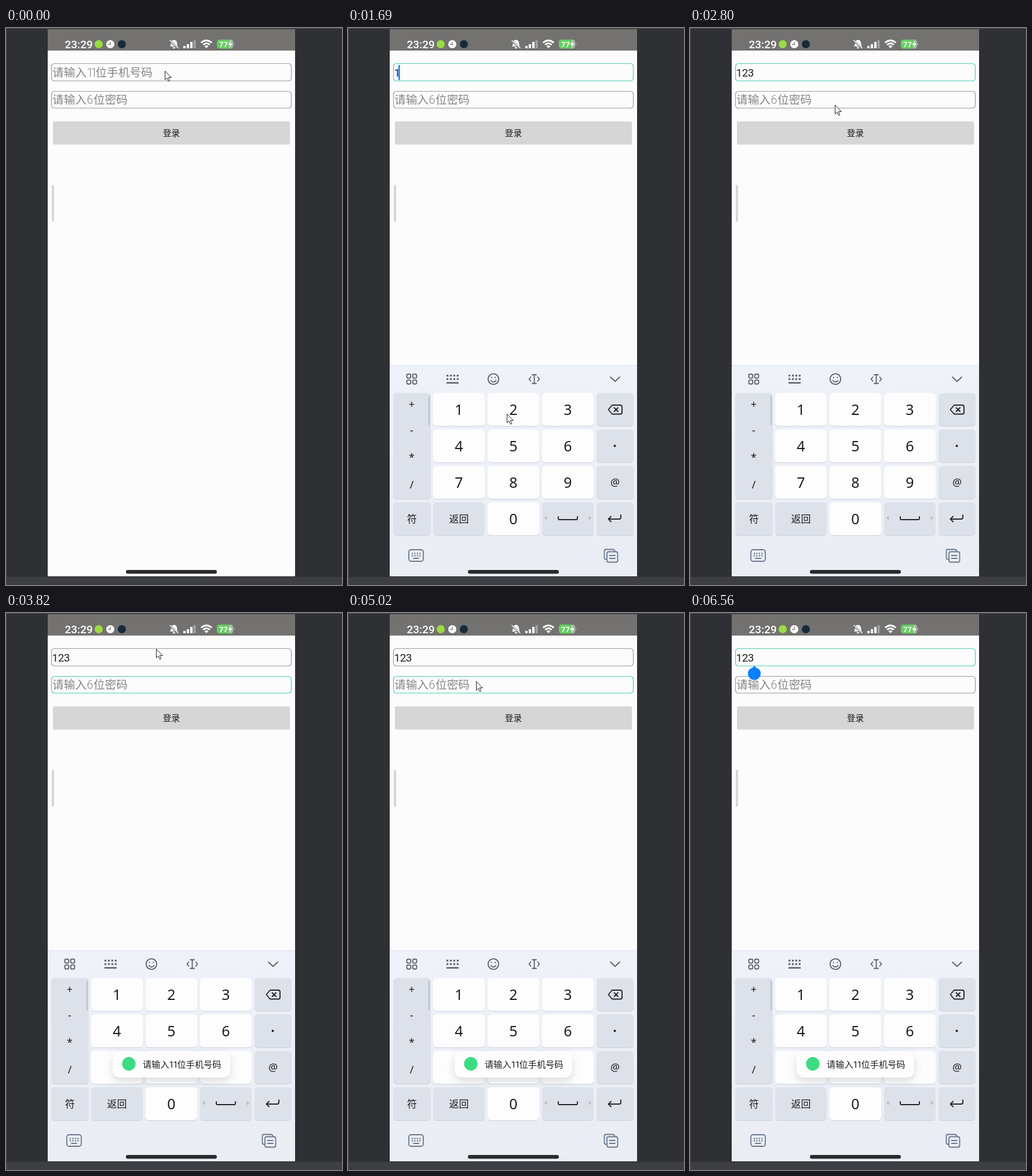
Recreate the animation shown at these times as an HTML page. Size 580 px wide and 963 px high, loop 6580 ms.

```html
<!DOCTYPE html>
<html lang="zh-CN">
<head>
<meta charset="utf-8">
<title>登录</title>
<style>
  html, body { margin: 0; width: 100%; height: 100%; overflow: hidden; background: #2f3034; }
  svg { display: block; width: 100vw; height: 100vh; }
  text { font-family: "Noto Sans CJK SC", "Noto Sans CJK", "Noto Sans", sans-serif; }
  .digit { font-family: Roboto, "Noto Sans", sans-serif; }
  .key { font-family: "Noto Sans", "Open Sans", sans-serif; fill: #1d1d1f; text-anchor: middle; }
  .cjk { text-anchor: middle; fill: #1d1d1f; }
  .hint { font-size: 19.7px; font-weight: 300; fill: #858585; }
  .line { fill: none; stroke-linecap: round; stroke-linejoin: round; }
</style>
</head>
<body>
<svg viewBox="0 0 580 963" preserveAspectRatio="none">
  <defs>
    <clipPath id="screen"><rect x="72" y="2" width="427" height="946"/></clipPath>
    <linearGradient id="panel" x2="0" y2="1">
      <stop stop-color="#eef2fa"/><stop offset="1" stop-color="#eaedf3"/>
    </linearGradient>
    <filter id="soft" x="-20%" y="-40%" width="140%" height="200%">
      <feDropShadow dx="0" dy="6" stdDeviation="7" flood-color="#5a6172" flood-opacity=".22"/>
    </filter>
  </defs>

  <rect width="580" height="963" fill="#2f3034"/>
  <rect y="949" width="580" height="14" fill="#3e3f44"/>
  <path d="M0 .5H580M.5 0V963" stroke="#56575b"/>
  <rect x="72" y="2" width="427" height="946" fill="#fcfcfc"/>

  <g id="status">
    <rect x="72" y="2" width="427" height="37" fill="#737270"/>
    <text class="digit" x="101.5" y="35" font-size="19" font-weight="500" fill="#fff">23:29</text>
    <circle cx="160" cy="28" r="7" fill="#9bdc42"/>
    <circle cx="180" cy="28" r="7" fill="#fff"/>
    <path class="line" d="M180 24.5V28.5H176.8" stroke="#737270" stroke-width="1.4"/>
    <circle cx="200" cy="28" r="7" fill="#172a3a"/>
    <path d="M283 32C286 29 283 21 290 20.5C297 21 294 29 297 32ZM287.5 33.2H292.5A2.5 2.3 0 0 1 287.5 33.2Z" fill="#fff"/>
    <path d="M282 21L297 35" stroke="#737270" stroke-width="3.4"/>
    <path class="line" d="M283 21.5L297 34.5" stroke="#fff" stroke-width="1.5"/>
    <path d="M306 31h4v4h-4zM312 28h4v7h-4zM318 24h4v11h-4z" fill="#fff"/>
    <path d="M323.5 21h4v14h-4z" fill="#a3a2a0"/>
    <path d="M336.7 25.4Q346 17.5 355.300 25.400M340.200 29Q346 24 351.800 29" fill="none" stroke="#fff" stroke-width="2.800"/>
    <path d="M342.500 31.200Q346 28.800 349.500 31.200L346 35Z" fill="#fff"/>
    <rect x="364" y="20" width="28" height="15.500" rx="4.500" fill="#66ce61"/>
    <path d="M386 20h1.500a4.500 4.500 0 0 1 4.500 4.500v6.500a4.500 4.500 0 0 1-4.500 4.500h-1.500z" fill="#a9b3a7"/>
    <rect x="392.500" y="25.500" width="1.800" height="5" rx=".9" fill="#a3a2a0"/>
    <text class="digit" x="368" y="32.600" font-size="13" font-weight="700" fill="#fff">77</text>
    <path d="M388.500 22L383 29H386.800L385.500 34L391 27H387.300Z" fill="#fff"/>
  </g>

  <g id="form">
    <rect id="phoneBox" x="78.500" y="61.500" width="414" height="30" rx="5" fill="none" stroke-width="1.200"/>
    <rect id="passBox" x="78.500" y="109.500" width="414" height="29" rx="5" fill="none" stroke-width="1.200"/>
    <text id="phoneHint" class="hint" y="83.500"><tspan x="80">请输入</tspan><tspan class="digit" x="139.500" letter-spacing="-4">11</tspan><tspan x="154.500">位手机号码</tspan></text>
    <text class="hint" y="130.500"><tspan x="80">请输入</tspan><tspan class="digit" x="139.500">6</tspan><tspan x="151">位密码</tspan></text>
    <text id="phone" class="digit" x="79.500" y="84" font-size="19" letter-spacing="-.5" fill="#222"></text>
    <rect id="caret" width="2.600" height="26" fill="#1f7ff2"/>
    <path id="drop" d="M111 91.500Q114 95 119 97A11 11 0 1 1 103 97Q108 95 111 91.500Z" fill="#0a80ff"/>
    <rect x="81.500" y="163" width="409" height="39.500" rx="2" fill="#ececec"/>
    <rect x="81" y="161.500" width="409" height="39.500" rx="2" fill="#d6d6d6"/>
    <text class="cjk" x="285.500" y="186.500" font-size="14.700" font-weight="500">登录</text>
    <rect x="79" y="271" width="4" height="64" rx="2" fill="#d6d6d6"/>
  </g>

  <g clip-path="url(#screen)">
    <g id="keyboard">
      <rect x="72" y="583" width="427" height="366" fill="url(#panel)"/>
      <path d="M72 583.500H499" stroke="#dde1e8"/>
      <g id="keys"></g>
      <rect x="138.800" y="636" width="2.400" height="51" rx="1.200" fill="#bfc3cc"/>

      <g class="line" stroke="#5b5e64" stroke-width="1.800">
        <rect x="101.500" y="598.500" width="6.800" height="6.800" rx="2.200"/>
        <rect x="111.700" y="598.500" width="6.800" height="6.800" rx="2.200"/>
        <rect x="101.500" y="608.700" width="6.800" height="6.800" rx="2.200"/>
        <rect x="111.700" y="608.700" width="6.800" height="6.800" rx="2.200"/>
        <path d="M170 601H191M170 607H191" stroke-width="3.200" stroke-linecap="butt" stroke-dasharray="3.200 2.700"/>
        <path d="M171 613.500H190" stroke-width="2.600"/>
        <circle cx="251" cy="607" r="9.200"/>
        <path d="M246.500 609.500Q251 614.500 255.500 609.500M247.700 603.800V604.600M254.300 603.800V604.600"/>
        <path d="M318 599.500H325M318 614.500H325M321.500 599.500V614.500M315.500 603.500L312.500 607L315.500 610.500M327.500 603.500L330.500 607L327.500 610.500"/>
        <path d="M453 603.500L461 611L469 603.500"/>
      </g>

      <g class="line" stroke="#25262a" stroke-width="1.900">
        <path d="M456 652H470Q473 652 473 655V664.500Q473 667.500 470 667.500H456L450 660.500Q449.400 659.700 450 659ZM459.500 656.500L466 663M466 656.500L459.500 663"/>
        <path d="M363 845V848Q363 850 365 850H394Q396 850 396 848V845"/>
        <path d="M471 842V846Q471 849 468 849H450M454 844.500L449.500 849L454 853.500"/>
      </g>
      <path d="M343.500 843.500V851L338.500 847.200ZM415.500 843.500V851L420.500 847.200Z" fill="#b9bdc6"/>
      <circle cx="460.500" cy="722.500" r="1.900" fill="#1d1d1f"/>

      <g class="line" stroke="#6b788e" stroke-width="1.800">
        <rect x="105" y="902" width="25" height="20" rx="4"/>
        <path d="M111 908.500H124.500M111 912.500H124.500" stroke-dasharray=".1 4.300" stroke-width="2.400"/>
        <path d="M113 917H122"/>
        <path d="M446 918.500H445Q442.500 918.500 442.500 916V904Q442.500 901.500 445 901.500H457Q460 901.500 460.500 904.500"/>
        <rect x="447" y="905.500" width="18.500" height="18" rx="3"/>
        <path d="M451.500 912H461M451.500 917H461"/>
      </g>
    </g>

    <g id="toast">
      <rect x="184" y="758" width="203" height="45" rx="13" fill="#fdfdfd" filter="url(#soft)"/>
      <circle cx="212" cy="779.500" r="11.700" fill="#3ddc84"/>
      <text y="785.500" font-size="15.200" fill="#1d1d1f"><tspan x="236">请输入</tspan><tspan class="digit" x="281.500" letter-spacing="-1.500">11</tspan><tspan x="295.500">位手机号码</tspan></text>
    </g>
  </g>

  <rect x="207" y="937" width="157" height="6.500" rx="3.200" fill="#2b2b2d"/>
  <path id="mouse" d="M0 0V15L3.500 11.800L6 17.500L8.300 16.500L5.800 11H10.800Z" fill="#fff" stroke="#222" stroke-linejoin="round"/>
</svg>

<script>
const LOOP = 6580, BLINK = 510;
const $ = id => document.getElementById(id);
const GRAY = '#9c9c9c', TEAL = '#4fcfb9', CYAN = '#2fcfd3';

// Keypad
const columns = [[78, 65], [147, 89], [241, 89], [335, 89], [429, 64]];
const rows = [631, 694, 757, 820];
let keypad = '';

function addKey(col, row, label = '', { white = false, height = 57, size = 25, cls = 'key' } = {}) {
  const [x, w] = columns[col], y = rows[row];
  keypad += `<rect x="${x}" y="${y + 1}" width="${w}" height="${height}" rx="6" fill="#cbd0da"/>
    <rect x="${x}" y="${y}" width="${w}" height="${height}" rx="6" fill="${white ? '#fdfdfd' : '#dde1ea'}"/>
    <text class="${cls}" x="${x + w / 2}" y="${y + 28.5 + size * 0.36}" font-size="${size}">${label}</text>`;
}

addKey(0, 0, '', { height: 183 });
['+', '-', '*', '/'].forEach((sign, i) => {
  const y = [657, 702, 749, 796][i];
  keypad += `<text class="key" x="110" y="${y}" font-size="18">${sign}</text>`;
});
for (let n = 1; n <= 9; n++) addKey(1 + (n - 1) % 3, Math.floor((n - 1) / 3), n, { white: true });
addKey(2, 3, 0, { white: true });
addKey(4, 0);
addKey(4, 1);
addKey(4, 2, '@', { size: 18 });
addKey(0, 3, '符', { size: 17, cls: 'cjk' });
addKey(1, 3, '返回', { size: 17, cls: 'cjk' });
addKey(3, 3);
addKey(4, 3);
$('keys').innerHTML = keypad;

// Tracks hold each value until the next time: [ms, ...values]
const mouseTrack = [
  [0, 274, 74], [710, 274, 78], [840, 272, 167], [990, 265, 557], [1110, 222, 640],
  [1260, 194, 667], [1690, 274, 667], [1840, 284, 667], [2110, 366, 667], [2530, 318, 420],
  [2660, 256, 139], [2800, 250, 133], [2920, 249, 125], [3400, 252, 112], [3550, 255, 95],
  [3700, 258, 76], [3820, 259, 62], [4060, 256, 66], [4330, 246, 80], [4630, 233, 100],
  [4870, 223, 115], [5020, 221, 118], [5260, 222, 102], [5410, 224, 88], [5560, 225, 83],
  [6410, -50, -50]
];
const focusTrack = [[0, ''], [840, 'phone'], [3040, 'pass'], [5680, 'phone']];
const textTrack = [[0, ''], [1540, '1'], [1960, '12'], [2230, '123']];
const keyboardTrack = [[0, 366, 0], [990, 155, 0.5], [1110, 12, 0.92], [1260, 0, 1]];
const toastTrack = [[0, 0], [3160, 0.45], [3280, 1]];
const caretX = [80, 87, 99, 110.5];

const held = (track, t) => track.findLast(key => key[0] <= t);
const setAttrs = (id, attrs) => {
  for (const name in attrs) $(id).setAttribute(name, attrs[name]);
};

function draw(t) {
  const [, mx, my] = held(mouseTrack, t);
  const [focusTime, focus] = held(focusTrack, t);
  const [typeTime, value] = held(textTrack, t);
  const [, slide, alpha] = held(keyboardTrack, t);
  const onPhone = focus === 'phone', onPass = focus === 'pass';
  const sinceInput = t - Math.max(focusTime, typeTime);
  const caretOn = focus && Math.floor(sinceInput / BLINK) % 2 === 0;

  setAttrs('mouse', { transform: `translate(${mx + 0.5} ${my + 0.5})` });
  setAttrs('phoneBox', { stroke: onPhone ? (t < 1110 ? CYAN : TEAL) : GRAY });
  setAttrs('passBox', { stroke: onPass ? TEAL : GRAY });
  setAttrs('phoneHint', { opacity: value ? 0 : 1 });
  $('phone').textContent = value;
  setAttrs('caret', {
    x: onPass ? 80 : caretX[value.length],
    y: onPass ? 111 : 64,
    opacity: caretOn ? 1 : 0
  });
  setAttrs('drop', { opacity: onPhone && t >= 5680 ? 1 : 0 });
  setAttrs('keyboard', { transform: `translate(0 ${slide})`, opacity: alpha });
  setAttrs('toast', { opacity: held(toastTrack, t)[1] });
}

const start = performance.now();
function tick() {
  draw((performance.now() - start) % LOOP);
  requestAnimationFrame(tick);
}
tick();
</script>
</body>
</html>
```
